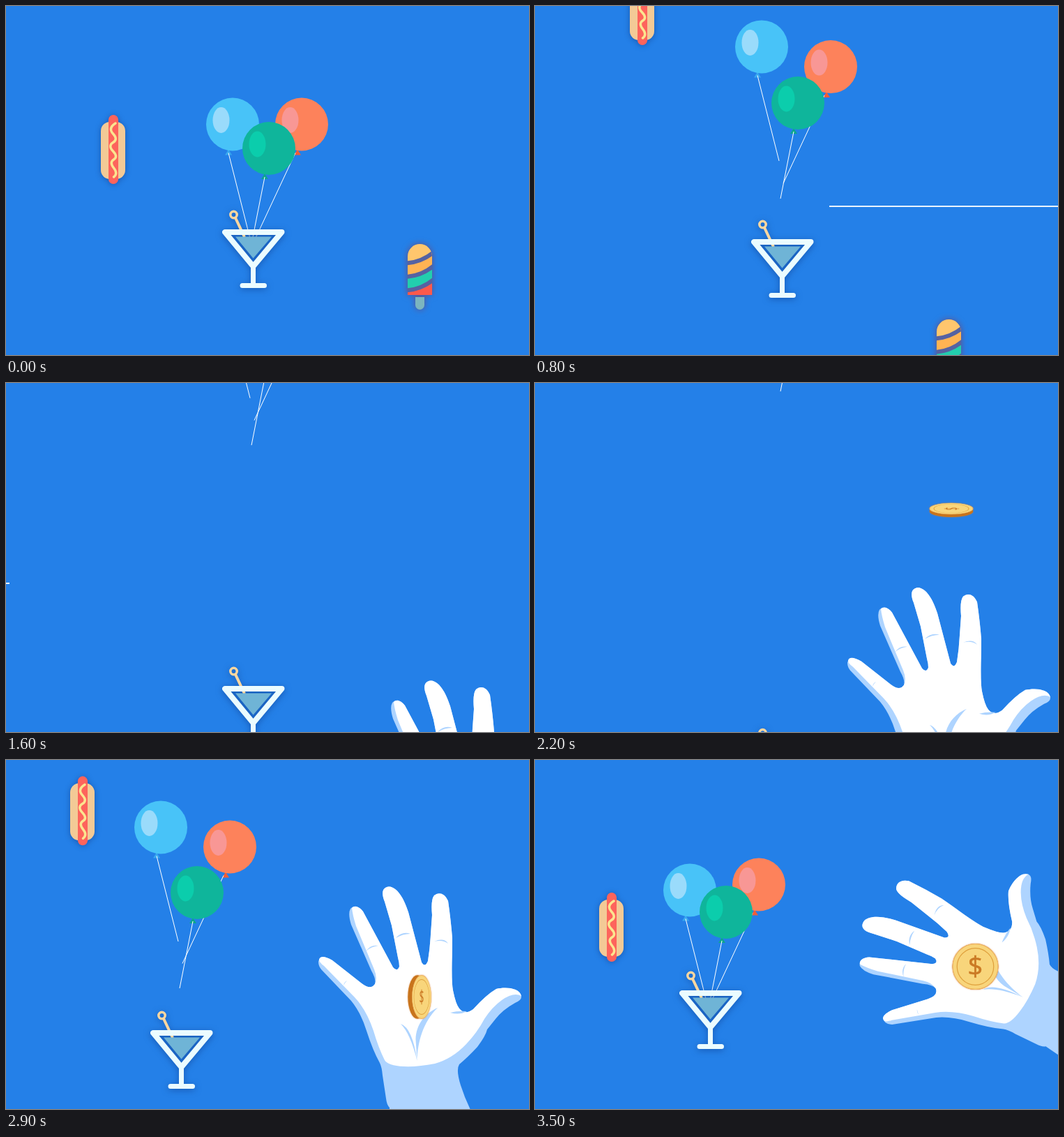
An HTML page for the animation above (3800 ms loop, 750 by 500 pixels).

```html
<!DOCTYPE html>
<html lang="en">
<head>
<meta charset="utf-8">
<title>Party treats</title>
<style>
html, body { margin: 0; width: 100%; height: 100%; overflow: hidden; background: #2480e8; }
svg { display: block; width: 750px; height: 500px; }
.string { stroke: #fff; stroke-width: 1; }
#dog { filter: drop-shadow(0 1px 4px rgba(10, 40, 110, .45)); }
#pop { filter: drop-shadow(0 0 5px rgba(120, 60, 100, .75)); }
#glass { filter: drop-shadow(0 2px 5px rgba(10, 50, 130, .5)); }
#coin { filter: drop-shadow(0 0 1px rgba(215, 120, 40, .6)); }
#coin text { font: 400 38px "Open Sans", "Noto Sans", sans-serif; fill: #cb7a24; stroke: #cb7a24; stroke-width: .5; text-anchor: middle; }
</style>
</head>
<body>
<svg viewBox="0 0 750 500">
  <clipPath id="ice"><path d="M576 414V358.5a17.5 17.5 0 0 1 35 0V414z"/></clipPath>
  <rect width="750" height="500" fill="#2480e8"/>
  <rect id="line" y="286" height="2" fill="#e9f3ff"/>

  <g id="dog">
    <rect x="136" y="166" width="35" height="82" rx="13" fill="#f3ca96"/>
    <rect x="147" y="156" width="14" height="99" rx="7" fill="#fd645c"/>
    <path d="M157 168Q146 175 153.5 183T153.5 195.5T153.5 208T154.5 220T154.5 232T154.5 245"
      fill="none" stroke="#fbe58f" stroke-width="3.5" stroke-linecap="round"/>
  </g>

  <g id="pop">
    <g clip-path="url(#ice)">
      <rect x="576" y="341" width="35" height="73" fill="#ffc66d"/>
      <path d="M574 368.5Q596 367 613 353V414H574z" fill="#ffb353"/>
      <path d="M574 388Q596 386.5 613 372.5V414H574z" fill="#22ceae"/>
      <path d="M574 407.5Q596 406 613 392V414H574z" fill="#fc594b"/>
      <path d="M574 368.5Q596 367 613 353M574 388Q596 386.5 613 372.5M574 407.5Q596 406 613 392"
        fill="none" stroke="#5562a2" stroke-width="6"/>
    </g>
    <path d="M587 417h13v11.5a6.5 6.5 0 0 1-13 0z" fill="#7cb5bf"/>
  </g>

  <g id="party">
    <g id="balloons"></g>
    <g id="glass">
      <g fill="none" stroke="#fdd7a0">
        <circle cx="326.5" cy="299" r="4.7" stroke-width="3.5"/>
        <path d="M329 303.5L342 331" stroke-width="4"/>
      </g>
      <path d="M329 330.5H381L354.5 361.5z" fill="#6fb4d6"/>
      <g fill="none" stroke="#ebfcff" stroke-linecap="round" stroke-linejoin="round">
        <path d="M314 324H395.5L354.5 373z" stroke-width="8"/>
        <path d="M354.5 373V400.5M339 400.5H370.5" stroke-width="7"/>
      </g>
    </g>
  </g>

  <g id="hand">
    <path id="shade" fill="#aed4ff"/>
    <path id="skin" fill="#fff"/>
    <path fill="#aed4ff" d="M516 274Q523 264 534 266Q524 267 516 274z
      M559 255Q568 245 580 249Q569 249 559 255z
      M614 260Q628 254 634 263Q626 257 614 260z
      M484 323Q485 318 489 316Q486 319 484 323z
      M637 362Q648 359 661 360Q650 366 637 362z
      M566 378Q583 384 589.5 431Q580 392 566 378z
      M619 355C600 363 588 380 587.5 400L589.5 431C590 405 598 375 619 355z"/>
  </g>

  <g id="coin">
    <ellipse id="edge" rx="32" ry="32" fill="#c8741c"/>
    <g id="face">
      <circle r="31.5" fill="#f8d57b" stroke="#efb765" stroke-width="1.2"/>
      <circle r="25.5" fill="none" stroke="#dfa03c" stroke-width="1.2"/>
      <text id="sign" y="13">$</text>
    </g>
  </g>
</svg>
<script>
const $ = id => document.getElementById(id);
const set = (id, attrs) => { for (const k in attrs) $(id).setAttribute(k, attrs[k]); };
const move = (id, x, y, more = '') => set(id, { transform: `translate(${x} ${y})${more}` });

// Progress of t from a to b, kept within 0 and 1
const leg = (t, a, b) => Math.min(1, Math.max(0, (t - a) / (b - a)));
const smooth = p => (1 - Math.cos(Math.PI * p)) / 2;

// id, centre, body, highlight and knot colours, ends of the string
const balloons = [
  ['blue', 325, 169.5, '#48c3f8', '#9adbfb', '#38a8f0', 319, 350, 333],
  ['orange', 424, 169.5, '#fd825b', '#f89795', '#f05c38', 415, 356, 336.5],
  ['green', 377, 204, '#0fb59b', '#0bcdac', '#0ca58f', 371, 352, 341]
];
$('balloons').innerHTML = balloons.map(([id, x, y, body, shine, knot, sx, ex, ey]) => `<g id="${id}">
  <path d="M${x - 6} ${y + 36}l5 8h-10z" fill="${knot}"/>
  <path class="string" d="M${sx} ${y + 41}L${ex} ${ey}"/>
  <circle cx="${x}" cy="${y}" r="38" fill="${body}"/>
  <ellipse cx="${x - 16.5}" cy="${y - 6}" rx="12" ry="18.5" fill="${shine}"/></g>`).join('');

// The fingers are shared by the skin and the shade beneath it
const pinky = 'C450 281 456 280 468 287L510 320Q523 330 529 321';
const fingers = `C499 208 506 209 512 217L555 297Q561 304 564 296Q564 290 562 283L553 237L543 203
  C536 186 543 181 551 181.5C563 184 572 202 577 218L596 290Q601 298 605 288Q608 270 609 250L611 222
  Q609 200 614 194C620 189 629 190 634 202Q638 230 640 255Q640 275 639.5 290Q639 320 641 330
  Q645 350 650 356Q658 366 670 357Q689 336 703 328C716 325 736 326 739 338`;
set('shade', { d: `M448 289${pinky}Q531 314 524 302L495 236Q490 220 494 213${fingers}
  Q740 344 730 348Q712 358 702 371L690 386Q688 395 676 411Q662 426 650 436Q645 444 652 466
  Q658 485 668 505L690 560V640H550V498Q546 494 545 485L540 452Q539 440 536 434
  Q526 416 517 388Q509 362 495 345L452 300Q448 295 448 289z` });
set('skin', { d: `M449 286${pinky}Q533 312 528 300L502 238Q497 222 496 212${fingers}
  Q728 332 711 344Q697 354 686 371Q676 390 660 407Q640 428 615 435Q590 440 570 439
  Q548 438 543 430Q534 412 527 388Q517 358 500 340L456 295Q449 290 449 286z` });

// Leaving: distance, start and duration. Coming back: resting place and lag.
const parts = [
  { id: 'blue', far: -361, start: 20, span: 2084, rest: 17, lag: -99 },
  { id: 'orange', far: -354, start: 132, span: 2084, rest: 9, lag: -63 },
  { id: 'green', far: -330, start: 190, span: 2084, rest: 14, lag: -37 },
  { id: 'glass', far: 250, start: 420, span: 2500, rest: 10, lag: 48 }
];

function drawTreats(t) {
  const back = t >= 2500;
  move('party', back ? -103 : 0, 0);
  for (const { id, far, start, span, rest, lag } of parts) {
    const leave = far * smooth(leg(t, start, start + span));
    const arrive = rest + 3 * (3500 - t) / 200 + lag * (Math.max(0, 3150 - t) / 250) ** 2;
    move(id, 0, back ? arrive : leave);
  }
  const drop = -250 + 230 * leg(t, 2400, 3100) ** 2 + 54 * leg(t, 3300, 3500);
  move('dog', back ? -44 : 0, back ? drop : -199 * (t / 800) ** 2);
  move('pop', 0, 108 * (t / 800) ** 4);
}

function drawLine(t) {
  const left = Math.max(0, 750 - 328 * (Math.max(0, t - 330) / 470) ** 1.5);
  const right = t < 1800 ? 5 + 745 * (1 - leg(t, 800, 1575)) ** 3 : 0;
  set('line', { x: left, width: right - left });
}

function drawHand(t) {
  const show = t >= 1600 ? 'visible' : 'hidden';
  set('hand', { visibility: show });
  set('coin', { visibility: show });

  const turn = leg(t, 2900, 3300), settle = leg(t, 3300, 3500);
  const x = 572.4 + 60 * (1 - leg(t, 2000, 2200)) - 17 * leg(t, 2900, 3100) - 16 * settle;
  const y = 248.4 + 250 * (1 - smooth(leg(t, 1477, 2832))) + 46 * turn - 44 * settle;
  move('hand', x, y, `rotate(${-55.5 * smooth(leg(t, 2900, 3465))}) translate(-572.4 -248.4)`);

  const tip = leg(t, 2200, 2900), squash = .26 + .18 * tip + .56 * turn;
  const fall = Math.min(339.5, 180 + .55 * (t - 2200));
  move('coin', 597 - tip + 39.5 * turn - 4 * settle, fall - 5 * turn - 38.5 * settle,
    `rotate(${90 * tip - 90}) scale(${.98 + .05 * turn})`);
  set('edge', { cx: (4 + 2 * tip) * (turn - 1), rx: 32 * squash });
  set('face', { transform: `scale(${squash} 1)` });
  set('sign', { transform: `scale(${.7 + .3 * turn})` });
}

// The motion is stepped: each pose holds for 200 ms, with a shift of beat around the coin's landing
function hold(t) {
  if (t < 400) return 0;
  if (t < 2500) return Math.min(2200, Math.floor(t / 200) * 200);
  if (t < 2900) return t < 2600 ? 2500 : 2600;
  return Math.min(3500, 2900 + Math.floor((t - 2900) / 200) * 200);
}

function frame(now) {
  const t = hold(now % 3800);
  drawTreats(t);
  drawLine(t);
  drawHand(t);
  requestAnimationFrame(frame);
}
frame(0);
</script>
</body>
</html>
```
